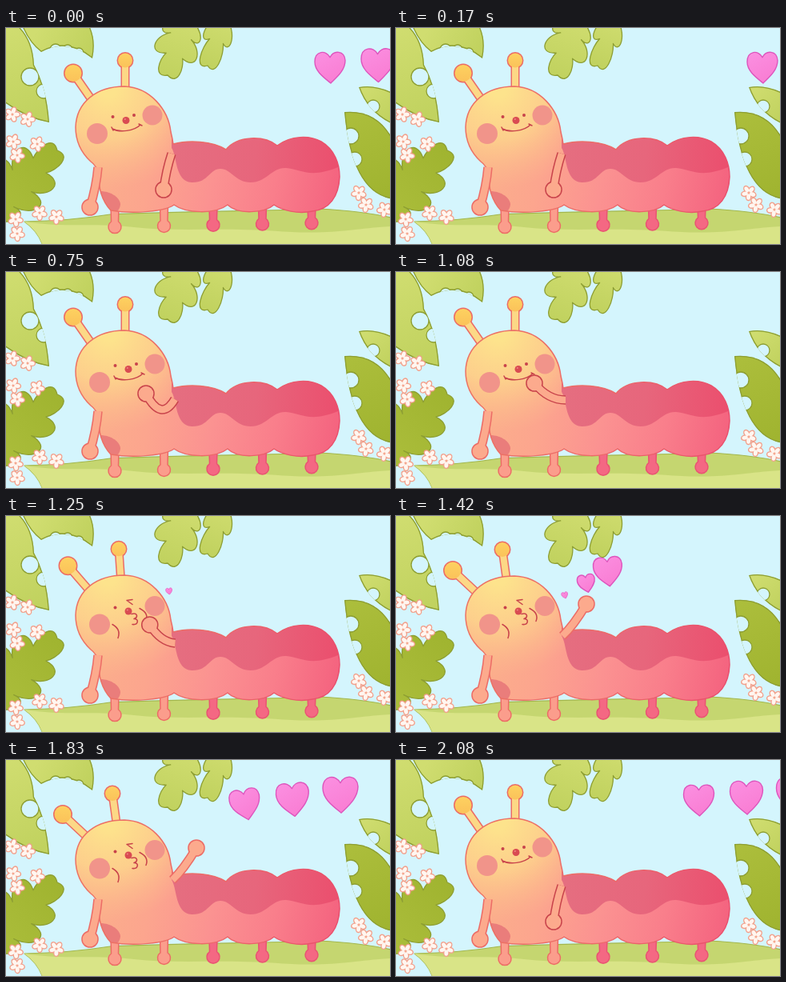
An HTML page with a canvas that plays this animation: 480 px wide and 270 px high, repeating every 2.16 s.

```html
<!DOCTYPE html>
<html lang="en">
<head>
<meta charset="utf-8">
<title>Caterpillar kisses</title>
<style>
html, body { margin: 0; width: 100%; height: 100%; overflow: hidden; background: #d4f5fd; }
canvas { display: block; width: 480px; height: 270px; }
</style>
</head>
<body>
<canvas id="stage" width="480" height="270"></canvas>
<script>
const ctx = document.getElementById('stage').getContext('2d');
const LOOP = 2160, STEPS = 26;
const SKY = '#d4f5fd', LINE = '#ec6c66', DARK = '#c8434b', EDGE = '#8d9e32';
const LIGHT = ['#d0dd70', '#c1d25f'], DEEP = ['#acbe3c', '#a0b430'];

const lerp = (a, b, k) => a + (b - a) * k;
const clamp = v => Math.max(0, Math.min(1, v));
const mix = (a, b, k) => a.map((v, i) => lerp(v, b[i], k));

// Smooth 0..1 between two steps
function ease(s, from, to) {
  const k = clamp((s - from) / (to - from));
  return k * k * (3 - 2 * k);
}

function grad(x0, y0, x1, y1, colors) {
  const g = ctx.createLinearGradient(x0, y0, x1, y1);
  colors.forEach((c, i) => g.addColorStop(i / (colors.length - 1), c));
  return g;
}

function paint(d, fill, stroke, width = 1.5) {
  const p = typeof d === 'string' ? new Path2D(d) : d;
  if (fill) { ctx.fillStyle = fill; ctx.fill(p); }
  if (stroke) { ctx.strokeStyle = stroke; ctx.lineWidth = width; ctx.stroke(p); }
}

function dot(x, y, r, fill, stroke, width) {
  const p = new Path2D();
  p.arc(x, y, r, 0, Math.PI * 2);
  paint(p, fill, stroke, width);
}

// A smooth leaf with round bites taken out of it
function bittenLeaf(d, fill, ...bites) {
  const p = new Path2D(d);
  ctx.save();
  ctx.clip(p);
  paint(p, fill, EDGE, 2.6);
  for (const [x, y, r] of bites) dot(x, y, r, SKY, EDGE, 1.3);
  ctx.restore();
}

// A leaf whose sides are rows of round lobes pointing at the tip
function lobedLeaf(bx, by, tx, ty, half, lobes, colors) {
  const len = Math.hypot(tx - bx, ty - by);
  const p = new Path2D();
  const wide = u => half * Math.sin(Math.PI * Math.min(1, 0.22 + u * 0.74));
  p.moveTo(0, 0);
  for (const side of [-1, 1]) {
    for (let n = 0; n < lobes; n++) {
      const i = side < 0 ? n : lobes - 1 - n;
      const a = i / lobes, b = (i + 1) / lobes;
      const end = side < 0 ? b : a;
      const notch = end === 1 ? 0 : wide(end) * 0.55;
      const out = side * wide((a + b) / 2);
      p.bezierCurveTo(len * lerp(a, b, side < 0 ? 0.4 : 1.35), out * 1.35,
        len * lerp(a, b, side < 0 ? 1.35 : 0.4), out * 1.35, len * end, side * notch);
    }
  }
  p.closePath();
  ctx.save();
  ctx.translate(bx, by);
  ctx.rotate(Math.atan2(ty - by, tx - bx));
  paint(p, grad(0, 0, len, 0, colors), EDGE, 1.3);
  ctx.restore();
}

function flower(x, y, turn) {
  ctx.save();
  ctx.translate(x, y);
  ctx.rotate(turn);
  for (const pass of [0, 1]) {
    for (let i = 0; i < 5; i++) {
      const a = i * Math.PI * 0.4;
      const p = new Path2D();
      p.ellipse(Math.cos(a) * 5, Math.sin(a) * 5, 3.8, 2.5, a, 0, 7);
      paint(p, pass ? '#fff6f0' : null, pass ? null : '#f29f8a', 2.8);
    }
  }
  dot(0, 0, 1.3, '#f5a890');
  ctx.restore();
}

function scenery() {
  ctx.fillStyle = SKY;
  ctx.fillRect(0, 0, 480, 270);
  paint('M23 242Q80 241 130 233C220 229 320 229 392 226Q445 229 482 237V272H46Q40 254 23 242Z', '#c5d670', '#a3b74c', 1.2);
  paint('M23 242C70 250 110 243 160 249S270 249 340 254S430 251 482 248V272H46Q40 254 23 242Z', '#d9e487');

  bittenLeaf('M20 -3Q29 19 44 30Q76 12 108 38Q113 15 104 -3Z', grad(40, 0, 100, 34, LIGHT),
    [62, 27, 7], [77, 27, 6], [91, 31, 6]);
  bittenLeaf('M-3 -3H15Q34 15 35 46Q51 75 54 118Q25 113 -3 92Z', grad(0, 0, 45, 110, LIGHT),
    [30, 61, 11], [47, 79, 9]);
  lobedLeaf(-24, 229, 64, 153, 34, 4, DEEP);
  lobedLeaf(227, -14, 202, 59, 25, 3, LIGHT);
  lobedLeaf(274, -14, 252, 47, 17, 2, LIGHT);
  bittenLeaf('M441 74Q462 70 485 82V121Q452 106 441 74Z', grad(445, 74, 480, 115, LIGHT), [459, 98, 8]);
  bittenLeaf('M423 105Q465 101 485 142V214Q432 208 423 105Z', grad(430, 105, 480, 205, DEEP),
    [431, 135, 10], [436, 164, 9]);

  const spots = [[8, 108], [27, 114], [9, 142], [39, 145], [14, 159], [12, 239], [14, 257],
    [42, 231], [63, 236], [441, 206], [450, 221], [473, 227]];
  spots.forEach(([x, y], i) => flower(x, y, i * 1.3));
}

function legs() {
  for (let i = 0; i < 5; i++) {
    const x = 136 + i * 61.5, y = 248 - i * 1.2;
    const p = new Path2D(`M${x - 5} 222L${x - 4.5} ${y - 6}A8 8 0 1 0 ${x + 4.5} ${y - 6}L${x + 5} 222Z`);
    paint(p, i < 2 ? '#fb9d8c' : '#f46883', i < 2 ? LINE : '#e95473');
  }
}

function antenna(bx, by, x, y, r) {
  const d = `M${bx} ${by}L${x} ${y}`;
  paint(d, null, LINE, 11);
  dot(x, y, r, null, LINE, 3);
  paint(d, null, '#fcd886', 8);
  dot(x, y, r, grad(0, y - r, 0, y + r, ['#fdd160', '#fbc25a']));
}

function body(lean) {
  const top = 73 + lean * 2;
  const skin = new Path2D(`M131 228C119 215 116 200 115 181Q113 172 106 167C93 155 87 140 87 124
    C88 93 113 ${top} 148 ${top}C180 ${top + 1} 203 102 206 130Q208 138 209 145
    C228 140 258 141 275 152C289 134 323 134 339 147C356 134 380 134 394 142
    C411 152 417 170 417 186C416 211 404 227 383 229C365 233 345 228 335 221
    C324 231 290 234 277 221C262 233 225 232 210 221C200 229 160 233 131 228Z`);
  paint(skin, grad(110, 140, 415, 205, ['#fbb08b', '#fca58e', '#fb9291', '#f97e8b', '#f4637f']));

  ctx.save();
  ctx.clip(skin);
  const glow = ctx.createRadialGradient(128, 76, 10, 128, 76, 125);
  glow.addColorStop(0, '#fde38c');
  glow.addColorStop(0.45, 'rgba(253,213,140,.85)');
  glow.addColorStop(1, 'rgba(252,190,140,0)');
  ctx.fillStyle = glow;
  ctx.fillRect(80, 65, 175, 145);
  paint('M207 140V150C214 160 211 192 232 193S254 176 268 176S286 193 306 193S332 174 350 175S380 190 420 172V130H209Z',
    grad(210, 150, 415, 170, ['#e56e80', '#e7667c', '#eb4f6e']));
  paint('M110 205C127 201 143 211 143 221Q142 229 133 234L110 225Z', '#ea7d7b');
  ctx.restore();
  paint(skin, null, grad(90, 0, 417, 0, ['#ec7264', '#ec6b69', '#e94e6c']));
}

function limb([sx, sy, ex, ey, hx, hy], line) {
  const d = `M${sx} ${sy}Q${ex} ${ey} ${hx} ${hy}`;
  const c = '#fcaa8d', r = 9.3;
  ctx.lineCap = 'butt';
  paint(d, null, line, 11.5);
  dot(hx, hy, r, null, line, 3);
  paint(d, null, c, 8.5);
  dot(hx, hy, r, c);
  ctx.lineCap = 'round';
}

function face(kiss, tuck) {
  ctx.save();
  ctx.translate(tuck * 3, tuck * (kiss ? 3.5 : 6));
  dot(114, 132, 13, '#f1948a');
  dot(183, 109, 12.5, '#f1948a');
  dot(133.5, 111, 2, DARK);
  dot(150, 115.5, 4.5, '#d94b52');
  dot(148.8, 114, 1.1, '#ee8582');
  if (kiss) {
    paint('M148 102L155 101M148 102L155 107', null, DARK);
    paint('M154 119C161 117 163 123 157 125C164 125 162 133 155 132', null, DARK, 1.6);
    paint('M130 132Q141 138 137 149M164 112Q176 118 172 128', null, DARK);
  } else {
    dot(160, 109, 2, DARK);
    paint('M133 126C142 131 160 129 168 121M132 124L134 128M166 120L170 122', null, DARK);
  }
  ctx.restore();
}

// Shoulder, elbow and hand
const REST = [207, 157, 200, 178, 197, 202];
const BENT = [211, 159, 194, 188, 175, 152];
const LIPS = [212, 160, 190, 160, 173, 139];
const BLOWN = [208, 150, 222, 137, 238, 110];

function arm(s) {
  const lifted = mix(mix(REST, BENT, ease(s, 6, 9)), LIPS, ease(s, 9, 12));
  return mix(mix(lifted, BLOWN, ease(s, 14.5, 17)), REST, ease(s, 23, 25));
}

// Each later heart leaves lower, smaller and slower, then all drift alike
function heart(i, s) {
  const w = Math.min(44 - i * 3, 36 - i * 14 + (s - 17) * 14);
  const x = 265 - i * 27 + (Math.min(s, 22) - 17) * (30.6 - i * 6.5) + Math.max(0, s - 22) * 26.5;
  if (w < 5 || x > 510) return;
  const rise = 1 - Math.min(1, (s - 17) / 5);
  const y = 43 + i * 6 + (26 + i * 9) * rise * rise - i * 3 * ease(s, 22, 26);
  ctx.save();
  ctx.translate(x, y);
  ctx.rotate(-0.08 * (rise + i) * (1 - ease(s, 22, 25)));
  ctx.scale(w / 40, w / 40);
  paint('M0 -13C-5 -23 -20 -22 -20 -7C-20 5 -9 13 1 21C9 13 20 4 20 -9C19 -22 5 -23 0 -13Z',
    grad(-10, -20, 12, 20, ['#fb8ee0', '#f97cd2']), '#dd55bd', 1.4 * Math.min(2, 40 / w));
  ctx.restore();
}

function draw(s) {
  const blown = s >= 16 && s < 24;
  const lean = ease(s, 13.5, 16.5) - ease(s, 23, 25);
  const tuck = ease(s, 5.5, 9) - ease(s, 23, 25);
  ctx.lineCap = ctx.lineJoin = 'round';
  scenery();
  legs();
  antenna(lerp(108, 101, lean), lerp(91, 96, lean), lerp(84, 71, lean), lerp(56.5, 68, lean), 10.5);
  antenna(lerp(149, 138, lean), 78, lerp(149, 133, lean), lerp(40.5, 42, lean), 9);
  body(lean);
  limb([115, 174, 113, 198, 105, 224], LINE);
  face(s >= 15 && s < 24, tuck);
  limb(arm(s), blown ? LINE : DARK);
  for (let i = 0; i < 3; i++) {
    heart(i, s);
    heart(i, s + STEPS);
  }
}

let last = -1;
function tick() {
  const s = Math.floor((performance.now() % LOOP) / LOOP * STEPS + 0.05) % STEPS;
  if (s !== last) draw(last = s);
  requestAnimationFrame(tick);
}
tick();
</script>
</body>
</html>
```
